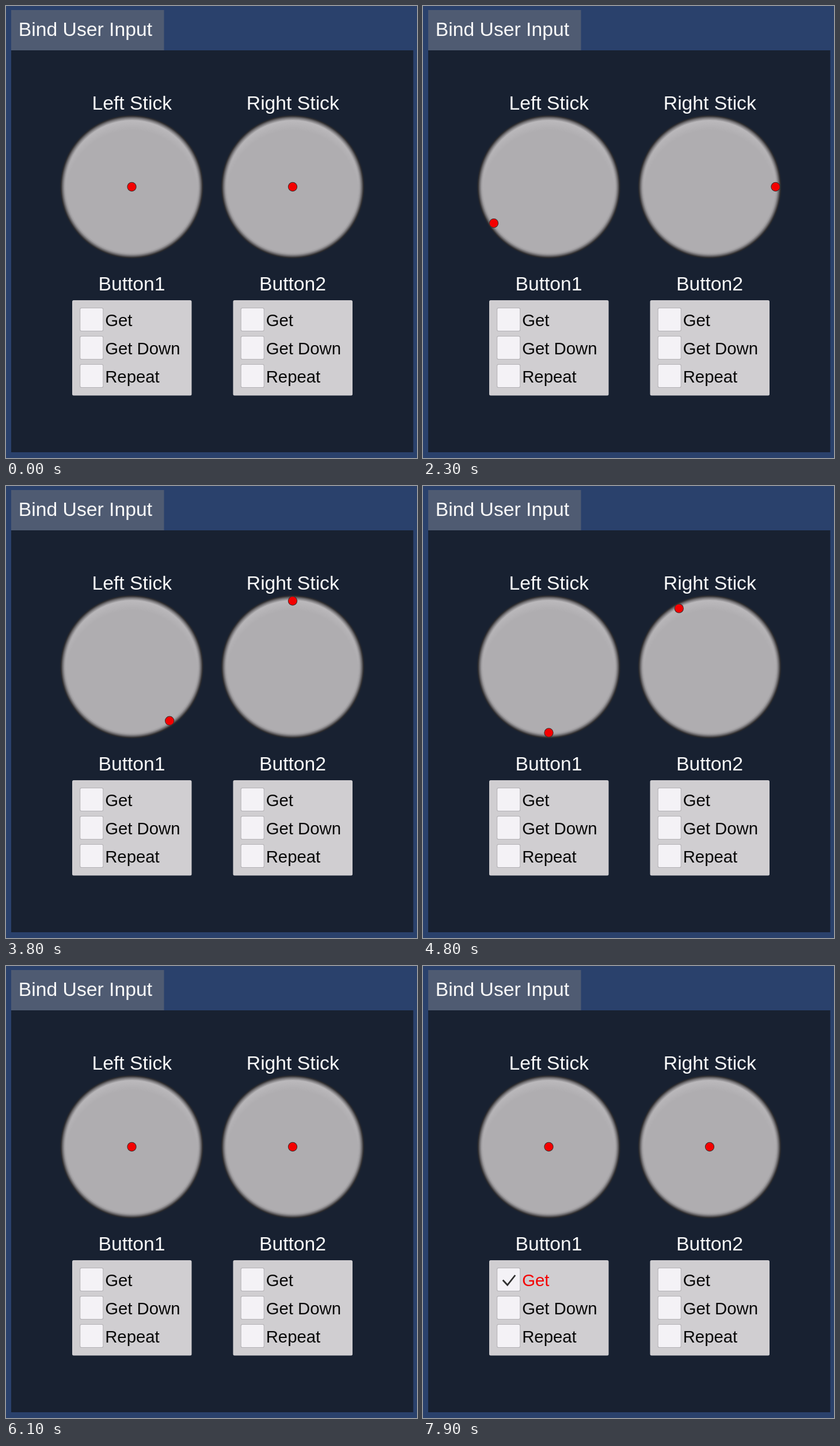
An HTML page with a canvas for the animation above (8 s loop, 714x785 px).

```html
<!DOCTYPE html>
<html lang="en">
<head>
<meta charset="utf-8">
<title>Bind User Input</title>
<style>
html, body { margin: 0; width: 100%; height: 100%; overflow: hidden; background: #2a416c; }
canvas { display: block; }
</style>
</head>
<body>
<canvas id="stage" width="714" height="785"></canvas>
<script>
const ctx = document.getElementById('stage').getContext('2d');
const LOOP = 8000, STEP = 100, PRESS = 7300;
const MID = 314, REACH = 114.5;
const WHITE = '#fafafa', RED = '#f40000';

// Both sticks spin counterclockwise; angles in degrees at shared times
const times = [2300, 3800, 4800, 5500];
const left = { x: 218.5, angles: [146.5, -305, -630, -900], release: 5500 };
const right = { x: 498, angles: [0, -450, -837.7, -1115.3], release: 5460 };

const clamp = v => Math.min(1, Math.max(0, v));

function spin(angles, t) {
  let i = 0;
  while (i < times.length - 2 && t > times[i + 1]) i++;
  const k = (t - times[i]) / (times[i + 1] - times[i]);
  return (angles[i] + (angles[i + 1] - angles[i]) * k) * Math.PI / 180;
}

function reach(release, t) {
  return REACH * clamp((t - 1900) / 100) * clamp(1 - (t - release) / 250);
}

function rect(x, y, w, h, color) {
  ctx.fillStyle = color;
  ctx.fillRect(x, y, w, h);
}

function roundBox(x, y, w, h, r, color) {
  ctx.beginPath();
  ctx.roundRect(x, y, w, h, r);
  ctx.fillStyle = color;
  ctx.fill();
}

function text(str, x, y, size, color, align = 'left') {
  ctx.font = size + 'px "Liberation Sans", Arial, sans-serif';
  ctx.fontKerning = 'none';
  ctx.textAlign = align;
  ctx.fillStyle = color;
  ctx.fillText(str, x, y);
}

function disc(x, y, r, fill) {
  ctx.beginPath();
  ctx.arc(x, y, r, 0, Math.PI * 2);
  ctx.fillStyle = fill;
  ctx.fill();
}

function radial(x, y, r0, r1, ...colors) {
  const g = ctx.createRadialGradient(x, y, r0, x, y, r1);
  colors.forEach((c, i) => g.addColorStop(i / (colors.length - 1), c));
  return g;
}

function pad(x) {
  disc(x, MID, 126, radial(x, MID, 114, 126,
    '#afadb0', '#a09ea1', '#6e6c6f', '#2d2c2e', 'rgba(24,33,49,0)'));
  disc(x, MID, 116, radial(x, MID + 16, 114, 133, 'rgba(190,188,191,0)', 'rgba(190,188,191,0.9)'));
}

function stick({ x, angles, release }, label, t) {
  text(label, x + 0.3, 180, 33.7, WHITE, 'center');
  pad(x);
  const a = spin(angles, t), r = reach(release, t);
  const dx = x + Math.cos(a) * r, dy = MID + Math.sin(a) * r;
  disc(dx, dy, 8.2, '#40302f');
  disc(dx, dy, 7.2, RED);
}

function tick(x, y, alpha) {
  ctx.globalAlpha = alpha;
  ctx.strokeStyle = '#303030';
  ctx.lineWidth = 2.8;
  ctx.beginPath();
  ctx.moveTo(x + 10.5, y + 21.5);
  ctx.lineTo(x + 18.5, y + 30);
  ctx.lineTo(x + 32, y + 13);
  ctx.stroke();
  ctx.globalAlpha = 1;
}

function toggles(x, title, alphas, held) {
  text(title, x, 494, 33.7, WHITE, 'center');
  roundBox(x - 103.5, 511, 207.5, 165.5, 2.5, '#d0ced1');
  ['Get', 'Get Down', 'Repeat'].forEach((label, i) => {
    const bx = x - 90.3, y = 524 + i * 49;
    roundBox(bx, y, 41, 41, 2.5, '#b4b2b6');
    roundBox(bx + 1, y + 1, 39, 39, 2, '#f4f2f6');
    tick(bx, y, alphas[i]);
    text(label, x - 46.3, y + 32, 29.3, i === 0 && held ? RED : '#080808');
  });
}

function draw(t) {
  rect(0, 0, 714, 785, '#2a416c');
  rect(9, 7, 265.5, 70, '#4f5b72');
  rect(9, 77, 698.5, 698, '#182131');
  text('Bind User Input', 21.8, 51.5, 33.7, WHITE);

  stick(left, 'Left Stick', t);
  stick(right, 'Right Stick', t);

  const get = clamp((t - PRESS + 35) / 100);
  const pulse = t === PRESS ? get : 0;
  toggles(left.x, 'Button1', [get, pulse, pulse], get === 1);
  toggles(right.x, 'Button2', [0, 0, 0], false);
}

const start = performance.now();
function loop(now) {
  const t = Math.max(0, now - start) % LOOP;
  draw(Math.floor(t / STEP) * STEP);
  requestAnimationFrame(loop);
}
draw(0);
requestAnimationFrame(loop);
</script>
</body>
</html>
```
